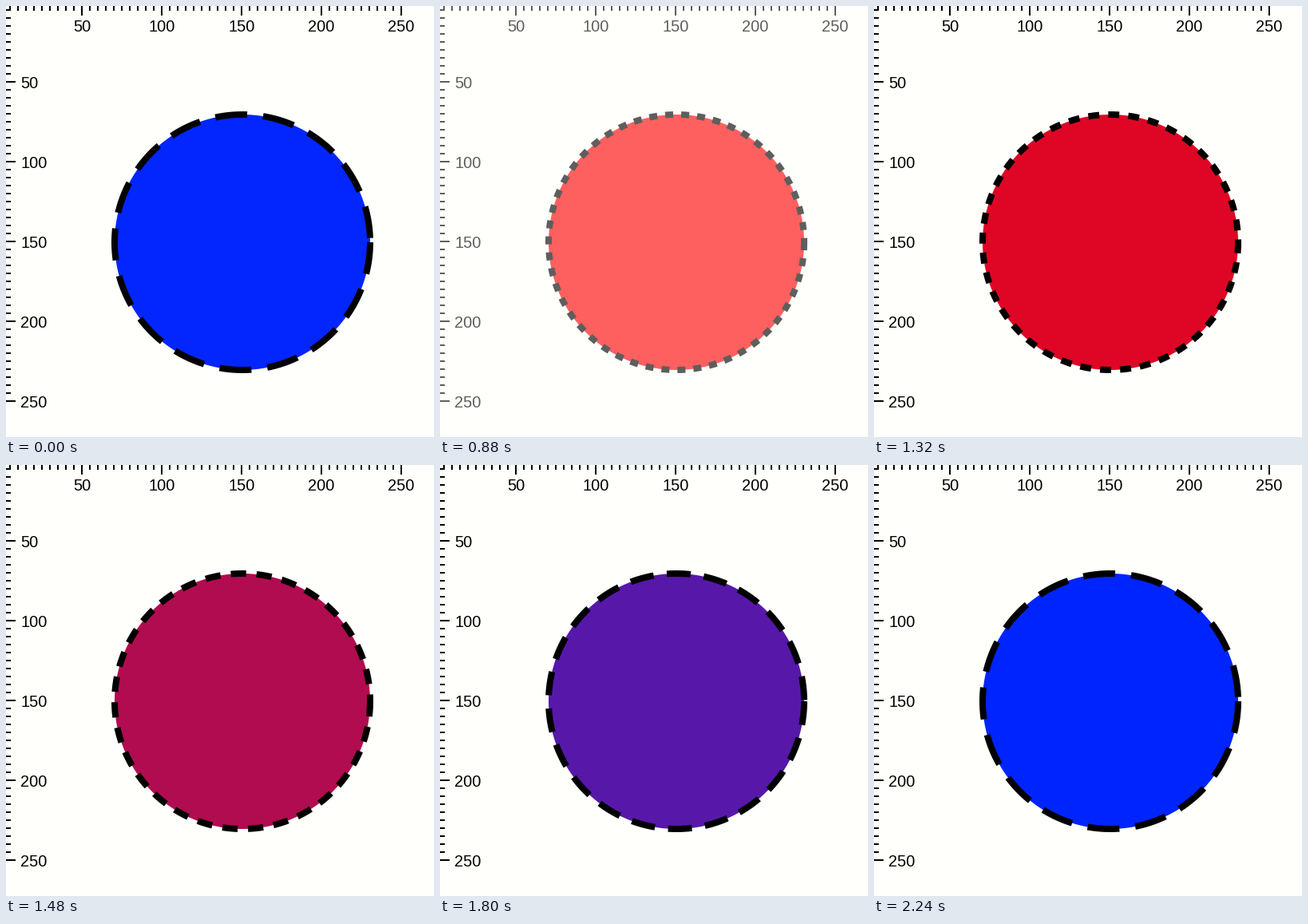
A matplotlib script that plays this animation: 536 px wide and 540 px high, repeating every 2.28 s.

```python
import numpy as np
import matplotlib.pyplot as plt
from matplotlib.animation import FuncAnimation
from matplotlib.patches import Rectangle

W, H, DPI = 536, 540, 100
STEP, FRAMES = 40, 57
PAPER = "#fffffc"
PX = 72 / DPI  # points per pixel
RAMP = 0.1     # share of time spent speeding up or slowing down
CENTER, RADIUS, STROKE = 296, 160, 8
RED = np.array([254, 2, 4]) / 255
BLUE = np.array([0, 36, 254]) / 255

plt.rcParams["font.family"] = "Liberation Sans"
plt.rcParams["path.simplify"] = False

fig = plt.figure(figsize=(W / DPI, H / DPI), dpi=DPI, facecolor=PAPER)
ax = fig.add_axes([0, 0, 1, 1])
ax.set(xlim=(0, W), ylim=(H, 0))
ax.axis("off")


def ease(u):
    """Constant speed with short soft ends."""
    u = min(max(u, 0), 1)
    if u < RAMP:
        s = u * u / (2 * RAMP)
    elif u > 1 - RAMP:
        s = 1 - RAMP - (1 - u) ** 2 / (2 * RAMP)
    else:
        s = u - RAMP / 2
    return s / (1 - RAMP)


def draw_rulers():
    for value in range(5, 251, 5):
        pos = 2 * value - 5
        major = value % 50 == 0
        size = 12 if major else 6
        style = dict(color="black", lw=2 * PX, solid_capstyle="butt")
        ax.plot([pos, pos], [0, size], **style)
        ax.plot([0, size], [pos, pos], **style)
        if major:
            ax.text(pos, 32, value, size=20 * PX, ha="center", va="baseline")
            ax.text(18, pos + 8, value, size=20 * PX, ha="left", va="baseline")


draw_rulers()
angle = np.linspace(0, 2 * np.pi, 361)
xs = CENTER + RADIUS * np.cos(angle)
ys = CENTER + RADIUS * np.sin(angle)
disc, = ax.fill(xs, ys, lw=0, zorder=3)
ring, = ax.plot(xs, ys, color="black", lw=STROKE * PX,
                dash_capstyle="butt", zorder=4)
veil = ax.add_patch(Rectangle((0, 0), W, H, color=PAPER, lw=0, zorder=10))


def update(i):
    t = i * STEP
    if t < 520:
        e, shown = 1, 1 - ease((t + 24) / 500)
    else:
        e, shown = ease((t - 1156.5) / 1000), ease((t - 572) / 500)
    disc.set_facecolor(RED + (BLUE - RED) * e)
    dash, gap = 10 + 30 * e, 10 + 10 * e
    ring.set_linestyle((0, (dash / STROKE, gap / STROKE)))
    veil.set_alpha(1 - shown)
    return disc, ring, veil


anim = FuncAnimation(fig, update, frames=FRAMES, interval=STEP,
                     repeat=True, repeat_delay=0, blit=False)
plt.show()
```
